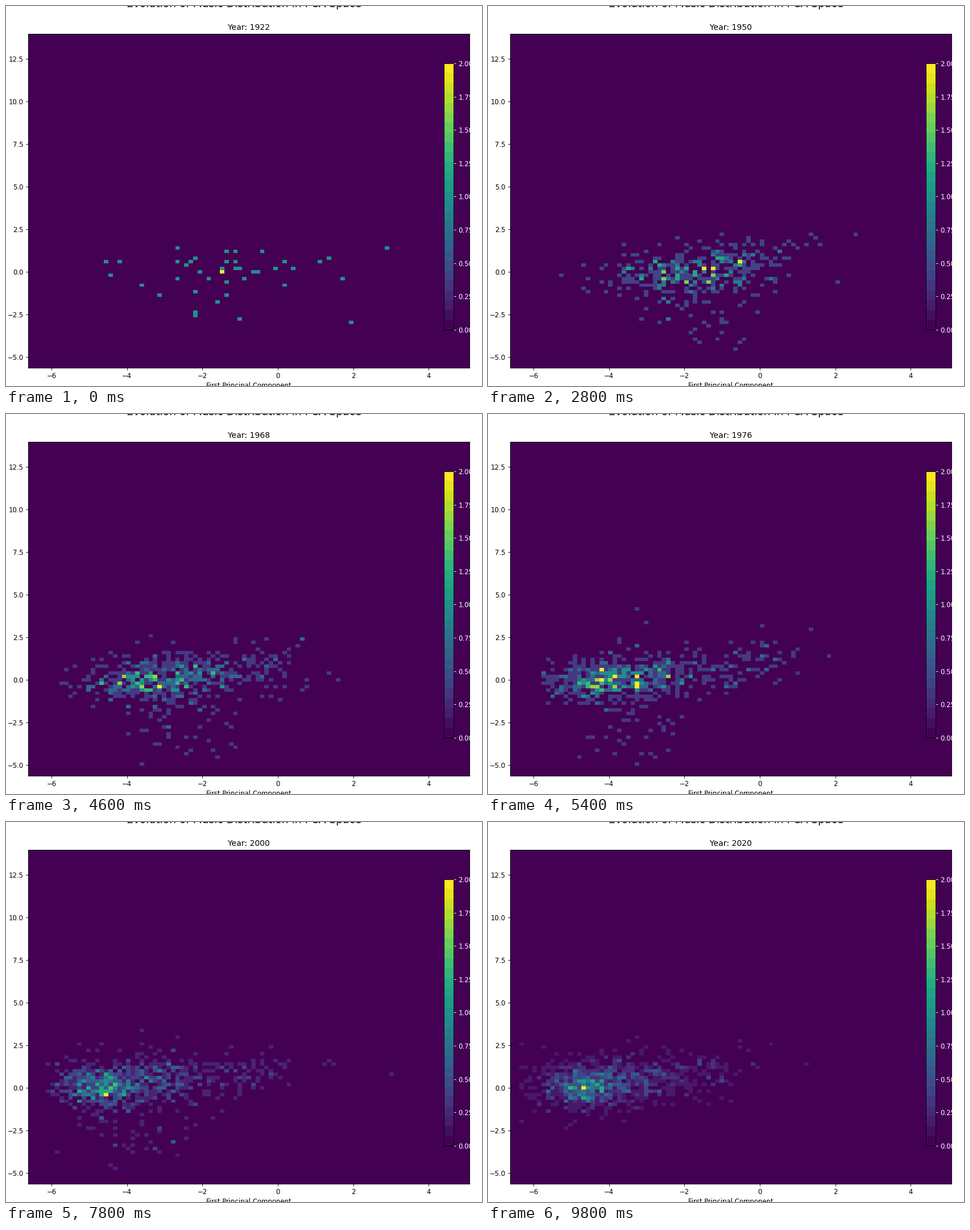
Recreate the animation shown at these times as a matplotlib script. Size 837 by 669 pixels, loop 9.9 s.

```python
import numpy as np
import matplotlib.pyplot as plt
from matplotlib.animation import FuncAnimation

W, H = 837, 669
DPI = 64
PT = 83.7 / DPI              # text and line scale
BINS = 99
FIRST, LAST = 1922, 2020

plt.rcParams.update({
    "font.family": "DejaVu Sans",
    "font.size": 10 * PT,
    "axes.linewidth": 0.8 * PT,
    "axes.titlesize": 12 * PT,
    "axes.titlepad": 6 * PT,
    "axes.labelpad": 4 * PT,
})
for side in ("xtick", "ytick"):
    plt.rcParams[side + ".major.size"] = 3.5 * PT
    plt.rcParams[side + ".major.width"] = 0.8 * PT
    plt.rcParams[side + ".major.pad"] = 3.5 * PT


def scatter(year):
    """Random cells from four clusters that drift left over the years."""
    rng = np.random.default_rng(year)
    t = (year - FIRST) / (LAST - FIRST)
    early = 1 / (1 + np.exp((year - 1967) / 6))
    home = 16 + 20 * early
    left = 12 - 10 * t
    songs = 44 + 960 * t ** 0.8
    low = 0.1 * np.sqrt(1 - t)
    tail = 0.18 - 0.1 * t
    # weight, column, row, column spread, row spread, slope
    clusters = [
        (0.7 - low - tail, home, 28.5 - 2 * early, 5 + 3 * early, 3.2, 0),
        (0.3, home + 12, 30.2 - early, 6.5, 3.4, 0.05),
        (tail, 60 - 18 * t, 31.5, 8, 3.3, 0.2),
        (low, home + 9, 14, 6.5, 5, 0),
    ]
    cols, rows = [], []
    for weight, col, row, dc, dr, slope in clusters:
        a, b = rng.standard_t(9, (2, round(songs * weight)))
        cols.append(left + np.abs(col + dc * a - left))
        rows.append(2 + np.abs(row + slope * dc * a + dr * b - 2))
    return np.concatenate(cols), np.concatenate(rows)


def density(year):
    """Counts per cell, scaled so the fullest cell is 2."""
    cols, rows = scatter(year)
    span = (-0.5, BINS - 0.5)
    grid = np.histogram2d(rows, cols, BINS, (span, span))[0]
    t = (year - FIRST) / (LAST - FIRST)
    peak = round(min(2 + (year - FIRST) / 2, 4.6 + 10.2 * t ** 3))
    grid = np.minimum(grid, peak)
    grid[np.unravel_index(grid.argmax(), grid.shape)] = peak
    return 2 * grid / peak


def box(x0, y0, x1, y1):
    """Axes rectangle from pixel edges, y down."""
    return [x0 / W, 1 - y1 / H, (x1 - x0) / W, (y1 - y0) / H]


fig = plt.figure(figsize=(W / DPI, H / DPI), dpi=DPI, facecolor="white")
ax = fig.add_axes(box(39.2, 49.1, 815.2, 636.7))
image = ax.imshow(density(FIRST), cmap="viridis", vmin=0, vmax=2,
                  origin="lower", aspect="auto", interpolation="nearest",
                  extent=(-6.618, 5.086, -5.63, 13.957))
ax.set_xticks(range(-6, 5, 2))
ax.set_yticks(np.arange(-5, 13, 2.5))
ax.yaxis.set_major_formatter("{x:.1f}")
ax.set_xlabel("First Principal Component")
title = ax.set_title(f"Year: {FIRST}")
fig.text(0.5, 1 - 2.5 / H, "Evolution of Music Distribution in PCA Space",
         ha="center", va="baseline", fontsize=16 * PT)

bar = fig.add_axes(box(770.2, 101, 787.2, 569.8))
bar.imshow(np.linspace(0, 2, 27)[:, None], cmap="viridis", vmin=0, vmax=2,
           origin="lower", aspect="auto", interpolation="nearest",
           extent=(0, 1, 0, 2))
bar.set_xticks([])
bar.set_yticks(np.linspace(0, 2, 9))
bar.yaxis.set_major_formatter("{x:.2f}")
bar.yaxis.tick_right()
bar.tick_params(axis="y", color="white", labelcolor="white")


def draw(frame):
    year = FIRST + frame
    image.set_data(density(year))
    title.set_text(f"Year: {year}")
    return image, title


anim = FuncAnimation(fig, draw, frames=LAST - FIRST + 1, interval=100,
                     repeat=True, repeat_delay=0, blit=False)
plt.show()
```
